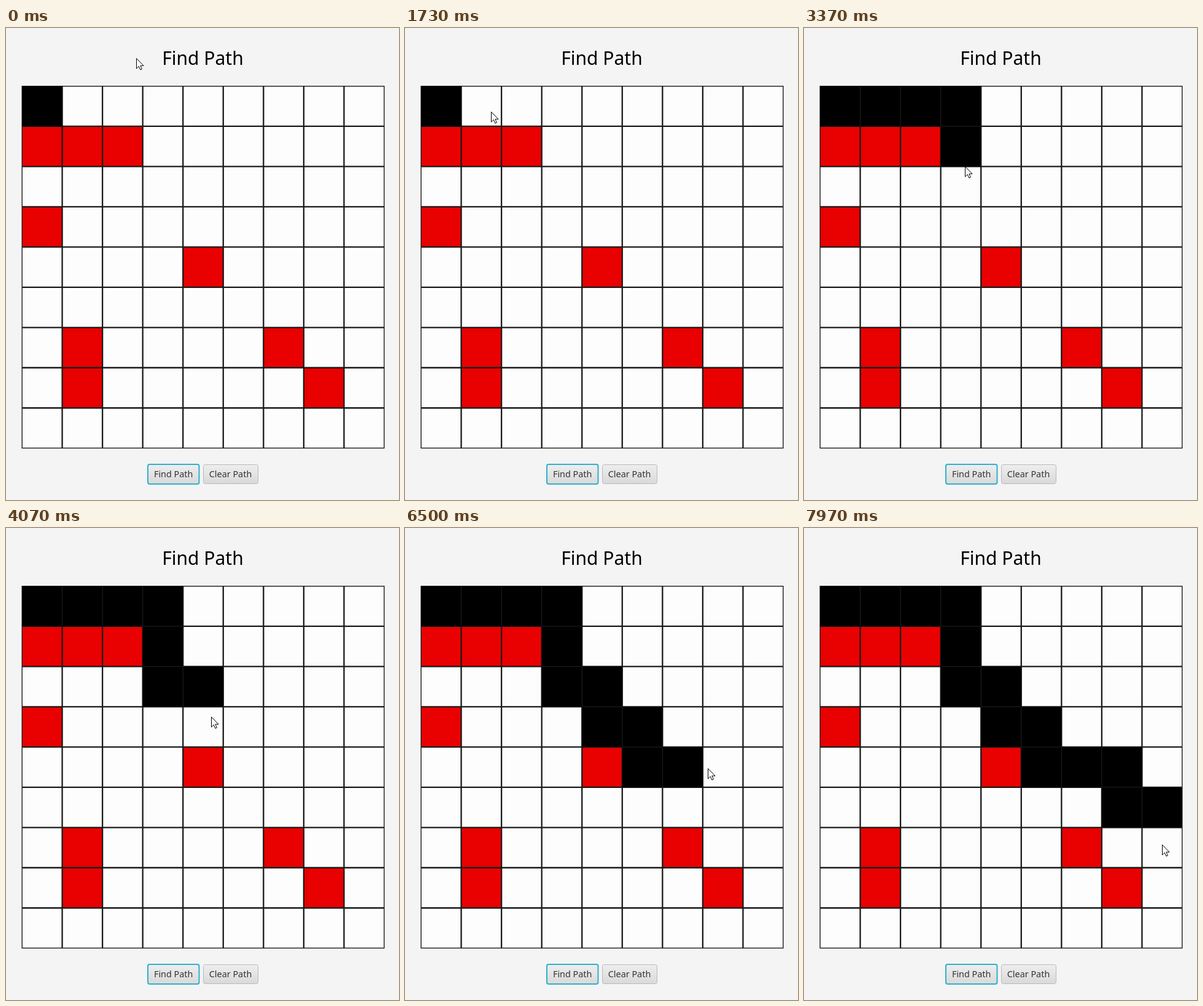
These frames come from a looping animation (640 px wide and 768 px high, 8000 ms). An HTML page:

```html
<!DOCTYPE html>
<html lang="en">
<head>
<meta charset="utf-8">
<title>Find Path</title>
<style>
  html, body { margin: 0; width: 100%; height: 100%; overflow: hidden; background: #f4f4f4; }
  svg { display: block; width: 100vw; height: 100vh; }
  text { font-family: "Noto Sans", "Open Sans", sans-serif; text-anchor: middle; }
  .label { font-size: 14.4px; fill: #333; }
</style>
</head>
<body>
<svg viewBox="0 0 640 768">
  <defs>
    <linearGradient id="face" x2="0" y2="1">
      <stop offset="0" stop-color="#eee"/>
      <stop offset="1" stop-color="#d9d9d9"/>
    </linearGradient>
  </defs>
  <rect width="640" height="768" fill="#f4f4f4"/>
  <text x="320.5" y="60" font-size="30">Find Path</text>
  <g id="cells"></g>
  <path id="lines" stroke="#1a1a1a" stroke-width="2.3"/>
  <rect x="26.2" y="94.7" width="589.6" height="588.8" fill="none" stroke="#1a1a1a" stroke-width="1.4"/>
  <g id="trail"></g>

  <rect x="231" y="710" width="83.5" height="32" rx="3" fill="url(#face)" stroke="#2fb0cc" stroke-width="2"/>
  <text class="label" x="272.7" y="731">Find Path</text>
  <rect x="321.5" y="710.5" width="89" height="31" rx="3" fill="url(#face)" stroke="#b9b9bd"/>
  <text class="label" x="365.5" y="731">Clear Path</text>

  <path id="cursor" d="M.5.5V17L4.3 13.3 6.8 19 9.4 17.9 6.9 12.3H12Z" fill="#fff" stroke="#000"/>
</svg>
<script>
const DURATION = 8000, COUNT = 9;
const LEFT = 26, TOP = 94.5, COL = 590 / COUNT, ROW = 589.2 / COUNT;
const byId = id => document.getElementById(id);

const walls = [
  ".........",
  "###......",
  ".........",
  "#........",
  "....#....",
  ".........",
  ".#....#..",
  ".#.....#.",
  "........."
];

// Pointer rests, with the steps (Right, Down) clicked on the way to each
const rests = [
  { time: 0, x: 212, y: 49, steps: "" },
  { time: 1730, x: 140, y: 136, steps: "" },
  { time: 2700, x: 265, y: 139, steps: "RR" },
  { time: 4070, x: 334, y: 307, steps: "RDDR" },
  { time: 5070, x: 402, y: 333, steps: "DR" },
  { time: 6500, x: 493, y: 391, steps: "DR" },
  { time: DURATION, x: 583, y: 517, steps: "RDR" }
];

// Clicks are spread evenly between two rests
const trail = [{ time: 0, row: 0, col: 0 }];
const stops = [];
rests.forEach((rest, i) => {
  const from = i ? rests[i - 1].time : 0;
  [...rest.steps].forEach((step, k) => {
    let { row, col } = trail[trail.length - 1];
    if (step === "R") col++; else row++;
    const time = from + (rest.time - from) * (k + .5) / rest.steps.length;
    trail.push({ time, row, col });
    stops.push({ time, x: LEFT + (col + .6) * COL, y: TOP + (row + .55) * ROW });
  });
  stops.push(rest);
});

function addRect(parent, x, y, width, height, fill) {
  const rect = document.createElementNS("http://www.w3.org/2000/svg", "rect");
  const attributes = { x, y, width, height, fill };
  for (const key in attributes) rect.setAttribute(key, attributes[key]);
  byId(parent).append(rect);
  return rect;
}

const addCell = (parent, row, col, fill) =>
  addRect(parent, LEFT + col * COL, TOP + row * ROW, COL, ROW, fill);

addRect("cells", LEFT, TOP, COL * COUNT, ROW * COUNT, "#fdfdfd");
walls.forEach((line, row) => [...line].forEach((mark, col) => {
  if (mark === "#") addCell("cells", row, col, "#e90000");
}));

let grid = "";
for (let i = 1; i < COUNT; i++) {
  grid += `M${LEFT + i * COL} ${TOP}v${ROW * COUNT}M${LEFT} ${TOP + i * ROW}h${COL * COUNT}`;
}
byId("lines").setAttribute("d", grid);

const marks = trail.map(({ time, row, col }) => ({
  time, node: addCell("trail", row, col, "#000")
}));

// Faint seam between each pair of neighbouring steps
trail.slice(1).forEach(({ time, row, col }, i) => {
  const x = LEFT + col * COL, y = TOP + row * ROW;
  const seam = trail[i].row === row ? [x - .5, y, 1, ROW] : [x, y - .5, COL, 1];
  marks.push({ time, node: addRect("trail", ...seam, "#222") });
});

function draw(time) {
  const next = stops.findIndex(stop => stop.time > time);
  const a = stops[next - 1], b = stops[next];
  const p = (time - a.time) / (b.time - a.time), ease = p * p * (3 - 2 * p);
  const between = key => Math.round(a[key] + (b[key] - a[key]) * ease);
  byId("cursor").setAttribute("transform", `translate(${between("x")} ${between("y")})`);
  for (const mark of marks) {
    mark.node.setAttribute("visibility", time >= mark.time ? "visible" : "hidden");
  }
}

const start = performance.now();
function frame() {
  draw((performance.now() - start) % DURATION);
  requestAnimationFrame(frame);
}
frame();
</script>
</body>
</html>
```
